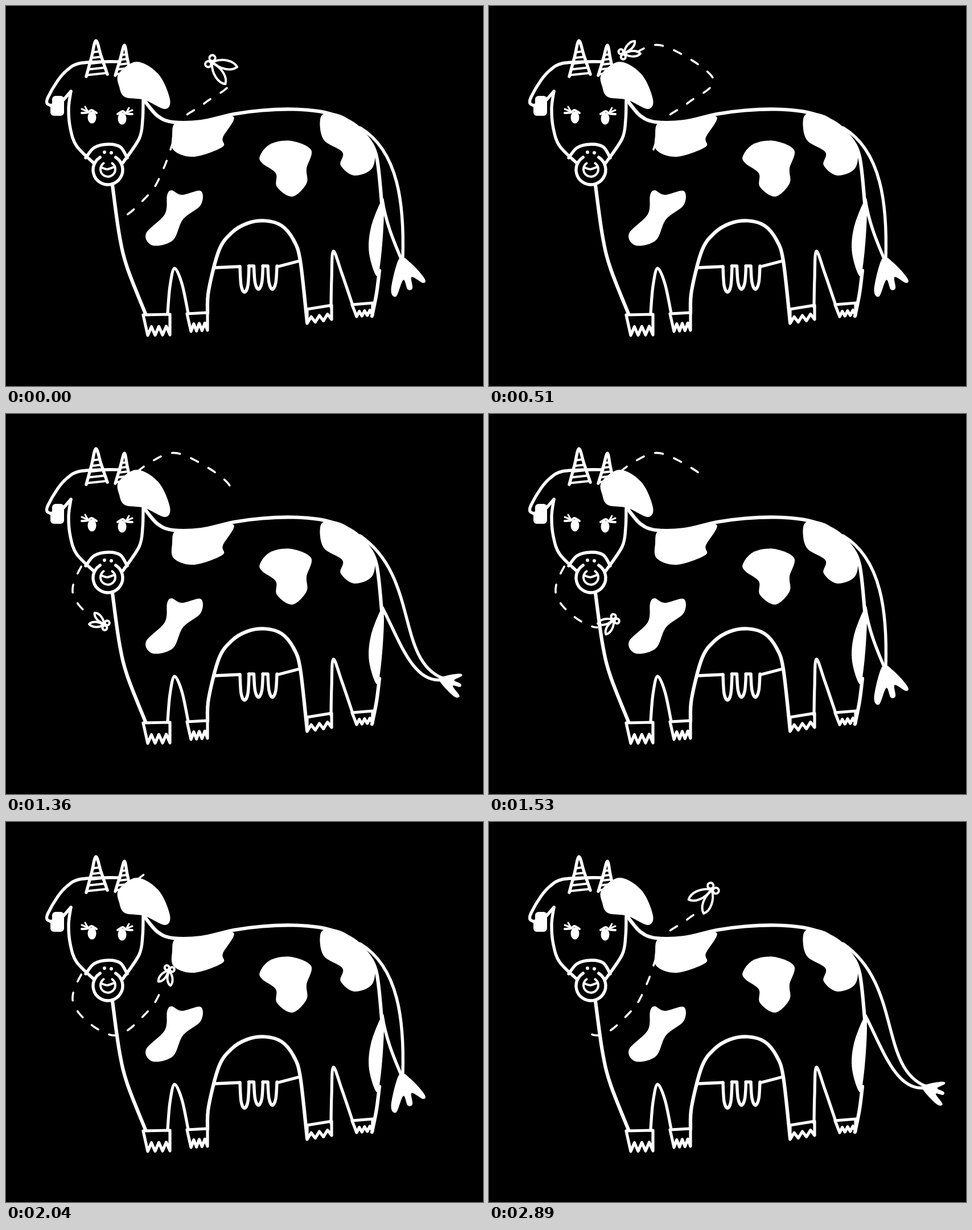
An HTML page with a canvas for the animation above (3060 ms loop, 838 by 668 pixels).

```html
<!DOCTYPE html>
<html lang="en">
<head>
<meta charset="utf-8">
<title>Cow and fly</title>
<style>
html, body { margin: 0; width: 100%; height: 100%; overflow: hidden; background: #000; }
canvas { display: block; }
</style>
</head>
<body>
<canvas id="stage" width="838" height="668"></canvas>
<script>
const ctx = document.getElementById('stage').getContext('2d');
const STEP = 170, POSES = 18, TAU = Math.PI * 2, RAD = Math.PI / 180;
const BODY = 6.2, HEAD = 5.4, FINE = 4;

const mix = (a, b, f) => a + (b - a) * f;
const mixAll = (a, b, f) => a.map((v, i) => mix(v, b[i], f));

const pairs = flat => {
  const out = [];
  for (let i = 0; i < flat.length; i += 2) out.push([flat[i], flat[i + 1]]);
  return out;
};

function ink(width) {
  ctx.lineWidth = width;
  ctx.stroke();
}

// Smooth curve through the given points
function trace(flat, closed) {
  const p = pairs(flat), n = p.length;
  const at = i => closed ? p[(i + n) % n] : p[Math.max(0, Math.min(n - 1, i))];
  ctx.beginPath();
  ctx.moveTo(...p[0]);
  for (let i = 0; i < (closed ? n : n - 1); i++) {
    const [a, b, c, d] = [at(i - 1), at(i), at(i + 1), at(i + 2)];
    ctx.bezierCurveTo(b[0] + (c[0] - a[0]) / 6, b[1] + (c[1] - a[1]) / 6,
      c[0] - (d[0] - b[0]) / 6, c[1] - (d[1] - b[1]) / 6, c[0], c[1]);
  }
}

function curve(width, ...flat) {
  trace(flat, false);
  ink(width);
}

function blob(...flat) {
  trace(flat, true);
  ctx.fill();
}

function line(width, ...flat) {
  ctx.beginPath();
  pairs(flat).forEach(q => ctx.lineTo(...q));
  ink(width);
}

function arc(width, x, y, r, from, to) {
  ctx.beginPath();
  ctx.arc(x, y, r, from * RAD, to * RAD);
  ink(width);
}

function oval(x, y, rx, ry) {
  ctx.beginPath();
  ctx.ellipse(x, y, rx, ry, 0, 0, TAU);
  ctx.fill();
}

function horn(tip, left, right) {
  const side = (end, f) => mixAll(tip, end, f);
  curve(HEAD, ...left, ...side(left, .45), ...tip, ...side(right, .45), ...right);
  for (let f = .32; f < 1; f += .16) line(FINE, ...side(left, f), ...side(right, f));
}

function eye(x, y, side) {
  const at = (dx, dy) => [x + side * dx, y + dy];
  oval(x, y, 7.5, 10.5);
  curve(FINE, ...at(-8, -8), ...at(1, -13), ...at(7, -9), ...at(18, -8));
  line(3, ...at(6, -10), ...at(18, -15));
  line(3, ...at(7, -10), ...at(12, -19));
}

function drawHead() {
  // hides whatever flies behind it
  ctx.fillStyle = '#000';
  blob(76, 170, 107, 113, 147, 98, 205, 98, 240, 165, 234, 233, 206, 276, 180, 312,
    153, 276, 124, 248, 112, 205, 114, 150);
  ctx.fillStyle = '#fff';
  curve(HEAD, 200, 98, 172, 98, 128, 101, 107, 113, 91, 131, 74, 160, 72, 171, 79, 175);
  line(HEAD, 100, 166, 114, 150);
  ctx.beginPath();
  ctx.roundRect(81, 158, 21, 24, 6);
  ctx.roundRect(78, 170, 24, 23, 6);
  ctx.fill();
  curve(HEAD, 114, 150, 110, 180, 113, 215, 124, 246, 155, 277);
  curve(HEAD, 241, 165, 240, 200, 234, 233, 205, 276);
  blob(198, 119, 230, 98, 268, 120, 288, 164, 279, 181, 243, 165, 209, 160, 199, 142);
  horn([158, 61], [141, 124], [178, 120]);
  horn([208, 69], [192, 122], [219, 119]);
  eye(151, 196, -1);
  eye(204, 198, 1);
  // muzzle with ring
  curve(HEAD, 140, 267, 155, 249, 180, 243, 201, 248, 213, 267);
  oval(173, 257, 3, 3);
  oval(185, 258, 3, 3);
  arc(HEAD, 179, 288, 26, -58, 238);
  arc(FINE, 179, 287, 13, -55, 235);
  curve(FINE, 168, 284, 178, 287, 190, 283);
}

// Square top and three ragged toes
function hoof(x, y, width, tilt, height, inset) {
  const toes = [];
  for (let i = 0; i <= 6; i++)
    toes.push(mix(x + inset, x + width, i / 6), y + tilt * i / 6 + height * (i % 2 ? .58 : 1));
  line(BODY - 1, x, y, ...toes, x + width, y + tilt, x, y);
}

function drawBody() {
  // back and rump, chest, legs, belly
  curve(BODY, 243, 166, 266, 193, 293, 204, 343, 203, 400, 190, 450, 183.5, 505, 181.5,
    560, 187, 605, 204, 632, 228, 651, 265, 660, 345);
  curve(BODY, 656, 465, 651, 505, 643, 545);
  curve(BODY, 187, 315, 199, 402, 213, 460, 245, 541);
  curve(BODY - 1, 284, 540, 288, 493, 296, 461, 309, 488, 320, 540);
  curve(BODY, 354, 540, 356, 500, 374, 430, 396, 399, 424, 382, 455, 377.5, 484, 386,
    505, 411, 517, 448, 529, 556);
  curve(BODY - 1, 571, 529, 572, 480, 575, 431, 590, 470, 609, 526);
  blob(660, 342, 641, 390, 638, 435, 652, 475, 660, 430, 664, 362);

  hoof(241, 543, 47, -1, 36, 8);
  hoof(318, 541, 36, -2, 31, 7);
  hoof(529, 533, 43, -7, 25, 0);
  hoof(608, 525, 36, -3, 21, 8);

  // udder
  line(HEAD, 367, 460, 411, 458);
  for (let i = 0; i < 3; i++) {
    const x = 411 + i * 24.5, end = i ? 498 : 503;
    curve(HEAD, x, 458, x + 2, end - 12, x + 8, end, x + 14, end - 12, x + 16, 457);
    if (i) line(HEAD, x - 9, 457, x, 457);
  }
  line(HEAD, 478, 458, 516, 448);

  // spots
  blob(300, 204, 292, 228, 295, 254, 330, 265, 380, 248, 381, 231, 400, 195, 350, 203);
  blob(446, 264, 464, 243, 500, 237, 536, 253, 528, 286, 528, 312, 503, 335, 476, 318, 474, 294, 451, 277);
  blob(552, 199, 566, 188, 600, 198, 643, 244, 644, 284, 612, 298, 588, 280, 591, 257, 558, 235);
  blob(283, 333, 291, 324, 309, 332, 342, 325, 342, 350, 311, 375, 293, 412, 258, 421, 246, 400, 279, 366);
}

// Two edges as Bezier handles, then tuft root, angle and size
const hanging = {
  top: [690, 255, 700, 350, 697, 445], low: [668, 385, 684, 420, 694, 444], tuft: [696, 445, 75, 54]
};
const raised = {
  top: [725, 285, 685, 430, 766, 464], low: [690, 395, 715, 475, 766, 467], tuft: [764, 466, 18, 36]
};

function drawTail(swing) {
  const part = name => mixAll(hanging[name], raised[name], swing);
  for (const [x, y, name] of [[622, 214, 'top'], [661, 340, 'low']]) {
    ctx.beginPath();
    ctx.moveTo(x, y);
    ctx.bezierCurveTo(...part(name));
    ink(HEAD);
  }
  const [x, y, angle, size] = part('tuft');
  ctx.save();
  ctx.translate(x, y);
  ctx.rotate(angle * RAD);
  ctx.scale(size, size);
  blob(-.05, .08, .85, .6, 1.12, .5, .66, .14, 1, .08, 1, -.08, .64, -.15, .92, -.45, .8, -.54, .2, -.24);
  ctx.restore();
}

// Closed flight route, its key points evenly spaced in time
const keys = pairs([312, 72, 262, 80, 205, 130, 150, 235, 118, 318, 188, 375,
  250, 332, 277, 285, 296, 232, 310, 198, 350, 170, 394, 128]);
const GAP = POSES / keys.length;

function route(t) {
  const u = t / GAP - .5, i = Math.floor(u), f = u - i, n = keys.length;
  const [a, b, c, d] = [-1, 0, 1, 2].map(k => keys[((i + k) % n + n) % n]);
  return [0, 1].map(k => b[k] + f / 2 * (c[k] - a[k] +
    f * (2 * a[k] - 5 * b[k] + 4 * c[k] - d[k] + f * (3 * (b[k] - c[k]) + d[k] - a[k]))));
}

function distance(from, to) {
  let sum = 0;
  for (let t = from; t < to; t += .05) {
    const [a, b] = [route(t), route(Math.min(to, t + .05))];
    sum += Math.hypot(b[0] - a[0], b[1] - a[1]);
  }
  return sum;
}

// Dashes stay put on the route; the visible stretch follows the fly
const MUZZLE = 5.8, DASH = distance(0, POSES) / 25;

function drawTrail(pose) {
  const from = pose - 9.2, to = pose - .7;
  ctx.beginPath();
  for (let t = from; t < to; t += .05) ctx.lineTo(...route(t));
  ctx.setLineDash([DASH * .4, DASH * .6]);
  ctx.lineDashOffset = distance(MUZZLE - POSES, from);
  ink(3.6);
  ctx.setLineDash([]);
}

// The fly rises above the route on its way up
function flyAt(t) {
  const [x, y] = route(t);
  return [x, y - 26 * Math.max(0, Math.sin((t - 13) / 5.5 * Math.PI))];
}

function drawFly(pose) {
  const [x, y] = flyAt(pose), [px, py] = flyAt(pose - .2);
  const turn = pose / POSES * TAU;
  const size = 30 + 9 * Math.cos(turn + .4) + 6 * Math.cos(2 * turn);
  ctx.save();
  ctx.translate(x, y);
  ctx.rotate(Math.atan2(py - y, px - x));
  for (const side of [-1, 1]) {
    ctx.beginPath();
    ctx.arc(0, side * (2.5 + size * .09), 2.5 + size * .06, 0, TAU);
    ink(FINE);
    ctx.save();
    ctx.translate(4, side);
    ctx.rotate(side * 23 * RAD);
    ctx.beginPath();
    ctx.moveTo(0, 0);
    for (const k of [-1, 1]) {
      const [a, b] = k < 0 ? [.35, .8] : [.8, .35], bow = k * size * .23;
      ctx.bezierCurveTo(size * a, bow, size * b, bow, k < 0 ? size : 0, 0);
    }
    ink(FINE);
    ctx.restore();
  }
  ctx.restore();
}

function draw(now) {
  const pose = Math.floor(now / STEP) % POSES;
  ctx.fillStyle = '#000';
  ctx.fillRect(0, 0, 838, 668);
  ctx.fillStyle = ctx.strokeStyle = '#fff';
  ctx.lineCap = ctx.lineJoin = 'round';
  drawBody();
  drawTail(pose % 3 / 2);
  drawTrail(pose);
  drawFly(pose);
  drawHead();
}

const start = performance.now();
function tick() {
  draw(performance.now() - start);
  requestAnimationFrame(tick);
}
tick();
</script>
</body>
</html>
```
